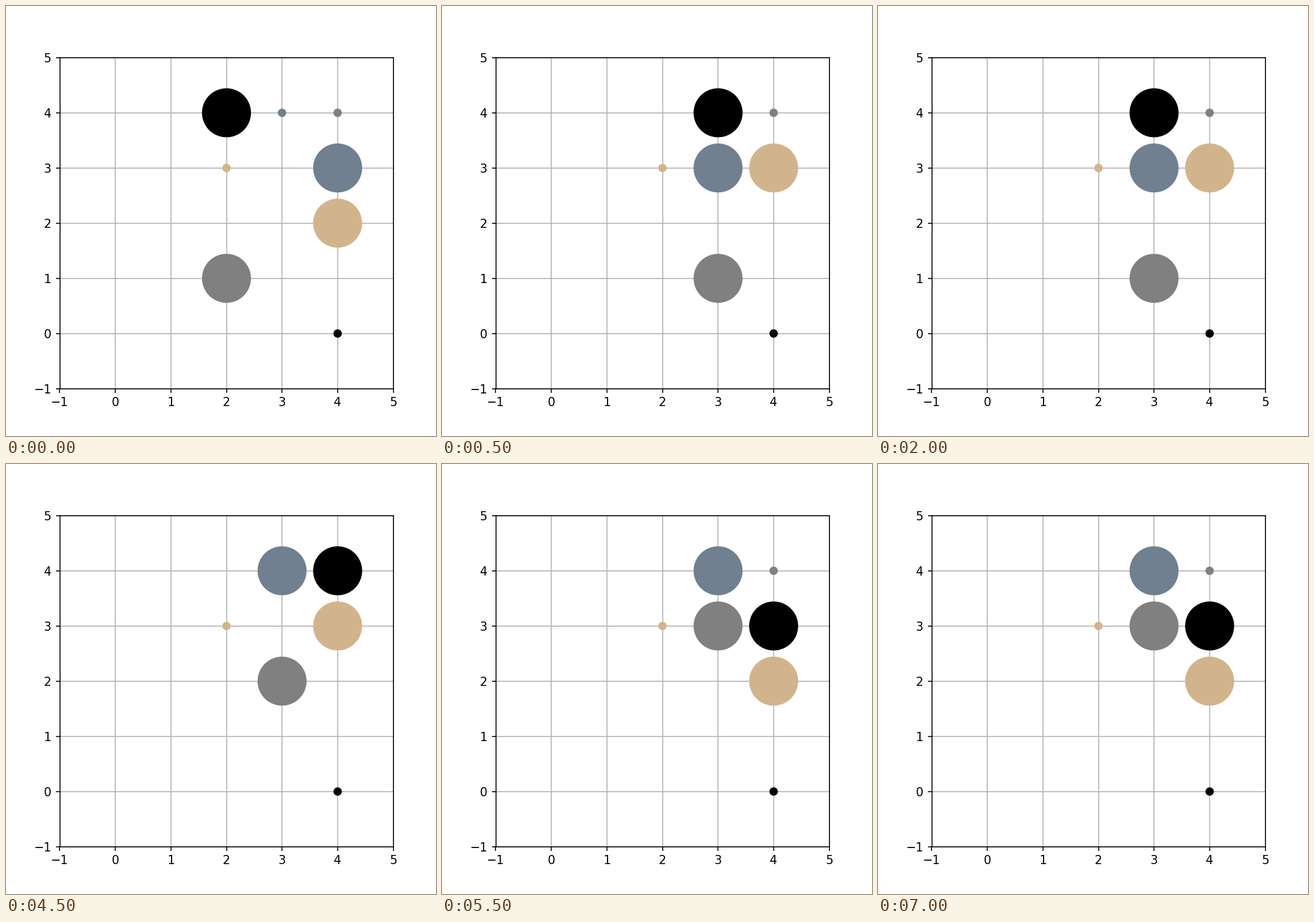
These frames come from a looping animation (748x748 px, 8000 ms). A matplotlib script:

```python
import matplotlib.pyplot as plt
import numpy as np
from matplotlib.animation import FuncAnimation

STEP_MS = 500
FRAMES = 16
MOVES = {"R": (1, 0), "L": (-1, 0), "U": (0, 1), "D": (0, -1), ".": (0, 0)}

# colour, start cell, goal cell, one move per step
AGENTS = [
    ("black", (2, 4), (4, 0), "RRD"),
    ("slategray", (4, 3), (3, 4), "LU."),
    ("tan", (4, 2), (2, 3), "U.D"),
    ("gray", (2, 1), (4, 4), "RUU"),
]
colors, starts, goals, routes = zip(*AGENTS)

plt.rcParams["font.family"] = "DejaVu Sans"
fig, ax = plt.subplots(figsize=(5, 5), dpi=149.6)
fig.subplots_adjust(right=0.9005)
ax.set(xlim=(-1, 5), ylim=(-1, 5), xticks=range(-1, 6), yticks=range(-1, 6))
ax.grid(True)


def dots(cells, size, zorder):
    x, y = zip(*cells)
    return ax.scatter(x, y, s=size**2, c=colors, linewidths=1, zorder=zorder)


dots(goals, 6, 2)
discs = dots(starts, 40, 2.1)


def position(start, route, step):
    return np.sum([start] + [MOVES[m] for m in route[:step]], axis=0)


def update(frame):
    # the opening pose lasts one tick, each later one five
    step = (frame + 4) // 5
    discs.set_offsets([position(s, r, step) for s, r in zip(starts, routes)])
    return [discs]


anim = FuncAnimation(fig, update, frames=FRAMES, interval=STEP_MS, repeat=True)
plt.show()
```
